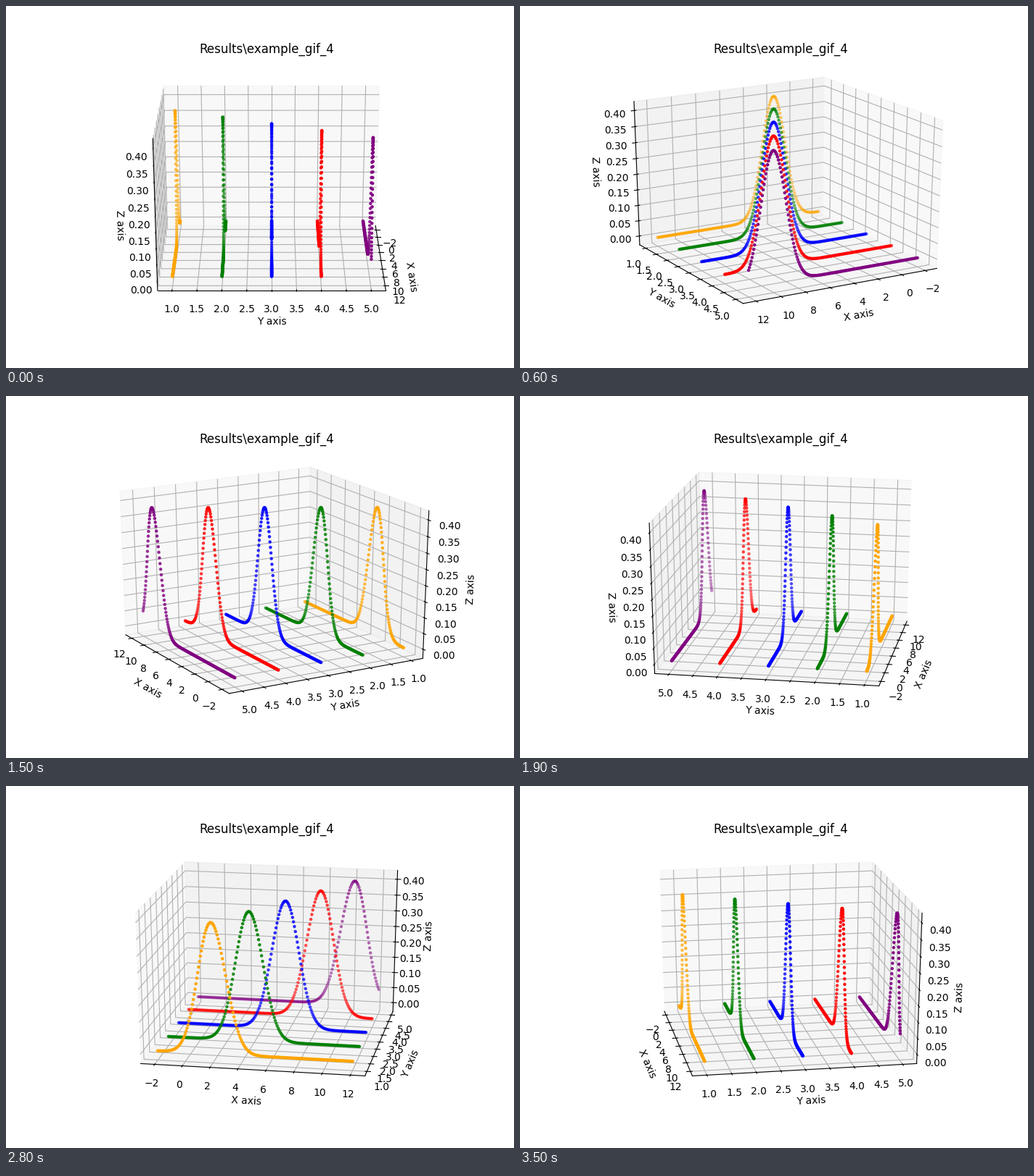
These frames come from a looping animation (700x500 px, 3600 ms). A matplotlib script:

```python
import math

import matplotlib.pyplot as plt
import numpy as np
from matplotlib.animation import FuncAnimation

FRAMES = 36
POINTS = 200
COLORS = ["orange", "green", "blue", "red", "purple"]


def bell(x, mean):
    return np.exp(-0.5 * (x - mean) ** 2) / math.sqrt(2 * math.pi)


def padded(values):
    """Data range with a 5 % margin plus the classic 1/48 pane offset."""
    lo, hi = np.min(values), np.max(values)
    pad = 0.05 * (hi - lo)
    lo, hi = lo - pad, hi + pad
    edge = (hi - lo) / 48
    return lo - edge, hi + edge


line = np.linspace(-2, 12, POINTS)
xs = np.tile(line, len(COLORS))
ys = np.repeat(np.arange(1.0, len(COLORS) + 1), POINTS)
zs = bell(xs, 2 * ys)
hues = [c for c in COLORS for _ in range(POINTS)]

fig = plt.figure(figsize=(7, 5), dpi=100)
ax = fig.add_subplot(projection="3d")
ax.scatter(xs, ys, zs, c=hues, marker=".", s=20)

# A cube stretched over the full, non-square axes area
ax.set_box_aspect((1, 1, 1), zoom=math.sqrt(3) / 1.8294640721620434)
ax.apply_aspect = lambda position=None: None

ax.set_xlim(*padded(xs))
ax.set_ylim(*padded(ys))
ax.set_zlim(*padded(zs))
ax.set_xticks(np.arange(-2, 13, 2))
ax.set_yticks(np.arange(1, 5.1, 0.5))
ax.set_zticks(np.arange(0, 0.41, 0.05))
ax.set_xlabel("X axis")
ax.set_ylabel("Y axis")
ax.set_zlabel("Z axis")
ax.set_title(r"Results\example_gif_4", y=1.0)
ax.title.set_y(0.966)


def update(i):
    azim = 360 * i / FRAMES
    # Tiny nudge settles which pane shows when a side is seen edge-on
    azim += 1e-6 * math.cos(math.radians(azim + 45))
    ax.view_init(elev=22, azim=azim)
    return []


anim = FuncAnimation(fig, update, frames=FRAMES, interval=100, repeat=True)
plt.show()
```
